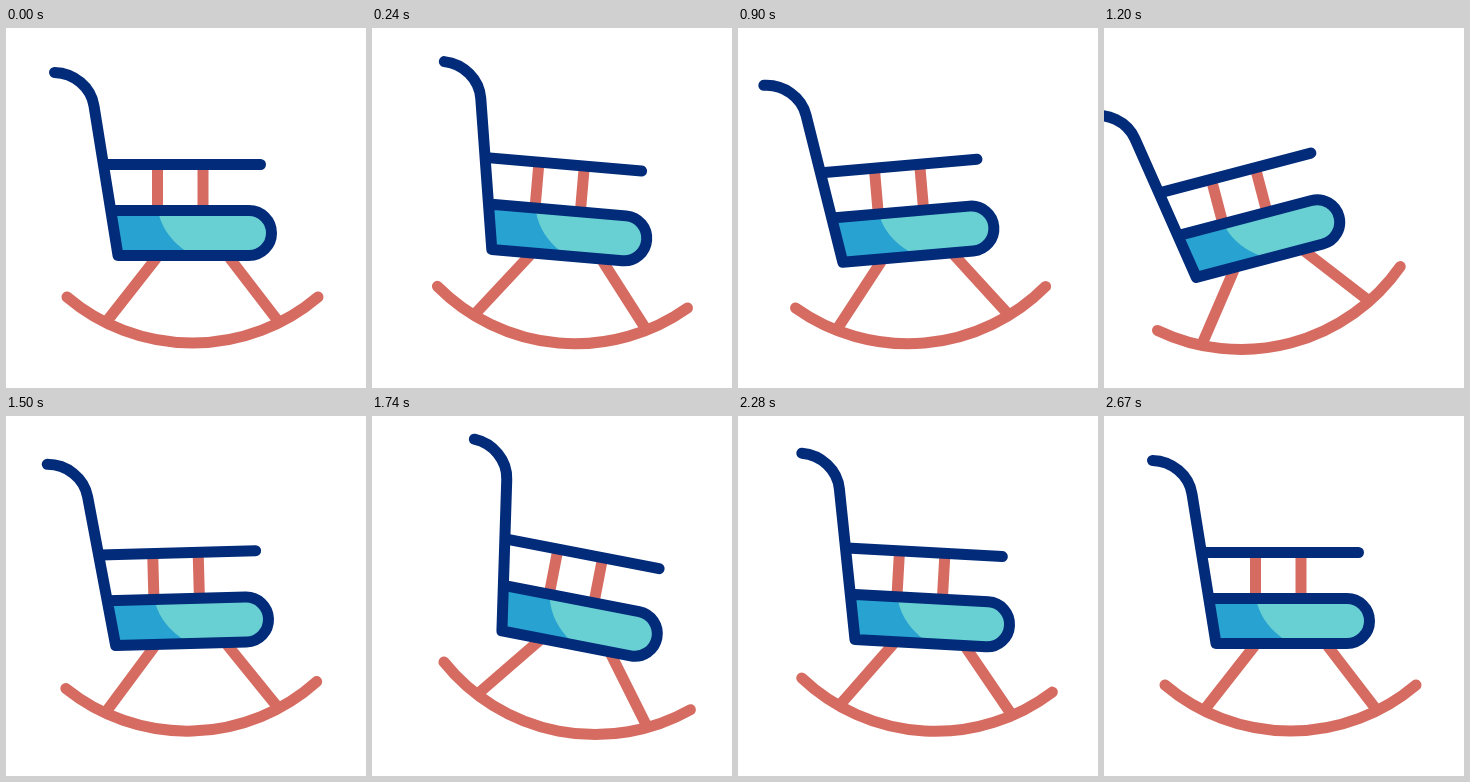
An HTML page for the animation above (2.7 s loop, 360x360 px).

```html
<!DOCTYPE html>
<html lang="en">
<head>
<meta charset="utf-8">
<title>Rocking chair</title>
<style>
  html, body { margin: 0; width: 100%; height: 100%; overflow: hidden; background: #fff; }
  svg { display: block; width: 100%; height: 100%; }
  .line { fill: none; stroke-width: 11; stroke-linecap: round; stroke-linejoin: round; }
  .wood { stroke: #d66c61; }
  .frame { stroke: #022b7a; }
</style>
</head>
<body>
<svg viewBox="0 0 360 360">
  <g id="chair">
    <g class="line wood">
      <path d="M151.5 138V180M197 138V180"/>
      <path d="M150 230.500L101 293M224 230.500L272 293"/>
      <path d="M61 269A194 194 0 0 0 312 269"/>
    </g>
    <path fill="#68d0d3" d="M105 182.500H243A22.500 22.500 0 0 1 243 227.500H112Z"/>
    <path fill="#28a2d1" d="M105 182.500H152L153 187Q159 209 181 224V227.500H112Z"/>
    <g class="line frame">
      <path d="M48.500 44.500C68 45 85 59 88 78L112 227.500H243A22.500 22.500 0 0 0 243 182.500H105"/>
      <path d="M99 136.500H254.500"/>
    </g>
  </g>
</svg>
<script>
const LOOP = 2700, TICK = 30;
const PIVOT = "186.5 314.7";
const chair = document.getElementById("chair");

// Swings: start step, end step, start angle, end angle, ease-out and ease-in handles
const swings = [
  [0, 16, 0, 16.5, 0.5, 0.67],
  [16, 32, 16.5, -15.8, 0.38, 0.67],
  [32, 51, -15.8, 12.4, 0.28, 0.78],
  [51, 75, 12.4, 0, 0.32, 0.39]
];

// Bezier timing curve with flat ends, solved by bisection
function ease(x, a, b) {
  let lo = 0, hi = 1;
  for (let i = 0; i < 24; i++) {
    const t = (lo + hi) / 2, u = 1 - t;
    if (3 * a * t * u * u + 3 * b * t * t * u + t * t * t < x) lo = t;
    else hi = t;
  }
  return lo * lo * (3 - 2 * lo);
}

// Every sixth tick holds the previous pose
function stepAt(ms) {
  const tick = Math.floor(ms / TICK);
  return tick ? tick - Math.floor((tick - 1) / 6) : 0;
}

function angleAt(step) {
  const [s0, s1, from, to, a, b] = swings.find(s => step <= s[1]);
  return from + (to - from) * ease((step - s0) / (s1 - s0), a, b);
}

function draw(ms) {
  const angle = angleAt(stepAt(ms % LOOP));
  chair.setAttribute("transform", `rotate(${angle.toFixed(3)} ${PIVOT})`);
}

const start = performance.now();
function loop() {
  draw(performance.now() - start);
  requestAnimationFrame(loop);
}
draw(0);
requestAnimationFrame(loop);
</script>
</body>
</html>
```
